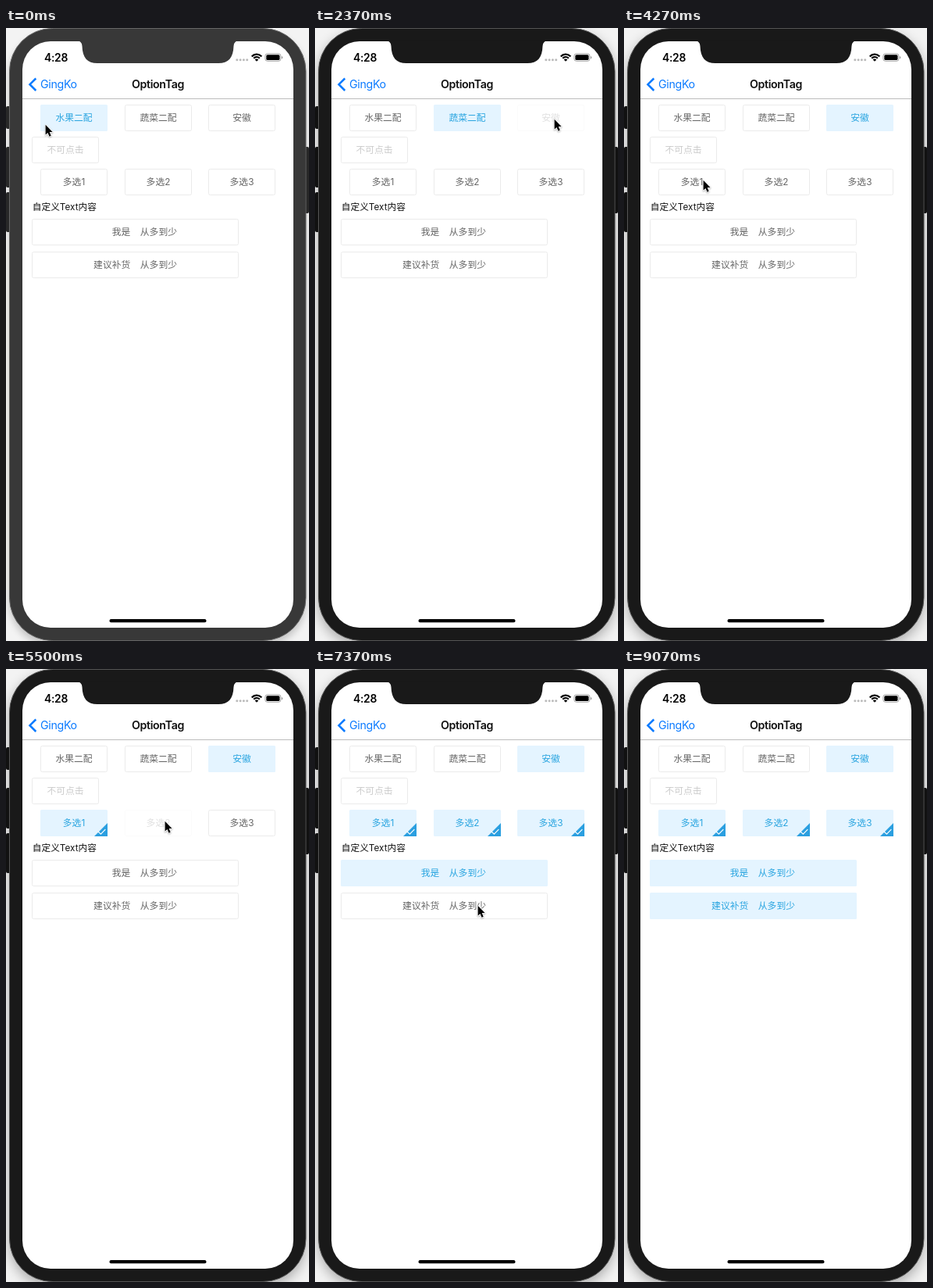
An HTML page with a canvas for the animation above (9.11 s loop, 388x784 px).

```html
<!DOCTYPE html>
<html lang="zh-CN">
<head>
<meta charset="utf-8">
<title>OptionTag</title>
<style>
  html, body { margin: 0; width: 100%; height: 100%; overflow: hidden; background: #f3f3f3; }
  canvas { display: block; width: 388px; height: 784px; }
</style>
</head>
<body>
<canvas id="stage" width="388" height="784"></canvas>
<script>
const canvas = document.getElementById('stage');
const ratio = window.devicePixelRatio || 1;
canvas.width = 388 * ratio;
canvas.height = 784 * ratio;
const ctx = canvas.getContext('2d');

const LOOP = 9110;
const ACTIVATE = 1000;
const LATIN = 'Inter, "Noto Sans CJK SC", "Noto Sans CJK", sans-serif';
const BLUE = '#2aa5e0';
const PALE = '#e4f4ff';
const GRAY = '#666';

// press / release in ms; on and off bound the selected state
const buttons = [
  { x: 44, y: 98, label: '水果二配', on: 0, off: 1260 },
  { x: 152, y: 98, label: '蔬菜二配', press: 1000, release: 1230, on: 1260, off: 2400 },
  { x: 259, y: 98, label: '安徽', press: 1930, release: 2370, on: 2400 },
  { x: 33, y: 139, label: '不可点击', disabled: true },
  { x: 44, y: 180, label: '多选1', press: 4630, release: 4790, on: 4820, tick: true },
  { x: 152, y: 180, label: '多选2', press: 5330, release: 5490, on: 5520, tick: true },
  { x: 259, y: 180, label: '多选3', press: 6010, release: 6170, on: 6200, tick: true },
  { x: 33, y: 244, w: 265, label: ['我是', '从多到少'], press: 6730, release: 6890, on: 6920 },
  { x: 33, y: 286, w: 265, label: ['建议补货', '从多到少'], press: 7430, release: 7590, on: 7620 }
];

// pointer stops: time, x, y
const path = [
  [0, 50, 123], [930, 177, 116], [1320, 177, 116], [1900, 306, 116],
  [2480, 306, 116], [3270, 107, 147], [3500, 112, 152], [3970, 112, 152],
  [4270, 101, 194], [4930, 101, 194], [5280, 203, 194], [5580, 203, 194],
  [5960, 300, 195], [6220, 300, 195], [6470, 274, 225], [6680, 240, 262],
  [6990, 240, 262], [7370, 208, 302], [7740, 208, 302], [8330, 390, 318]
];

const clamp = v => Math.min(1, Math.max(0, v));
const ease = v => v * v * (3 - 2 * v);
const mix = (a, b, p) => a + (b - a) * p;

function box(x, y, w, h, r, fill) {
  ctx.beginPath();
  ctx.roundRect(x, y, w, h, r);
  ctx.fillStyle = fill;
  ctx.fill();
}

function line(points, color, width) {
  ctx.beginPath();
  points.forEach(([x, y]) => ctx.lineTo(x, y));
  ctx.strokeStyle = color;
  ctx.lineWidth = width;
  ctx.stroke();
}

function shape(points, fill) {
  ctx.beginPath();
  points.forEach(([x, y]) => ctx.lineTo(x, y));
  ctx.closePath();
  ctx.fillStyle = fill;
  ctx.fill();
}

function text(str, x, y, size, color, align = 'center', weight = 400, spacing = 0) {
  ctx.font = `${weight} ${size}px ${LATIN}`;
  ctx.letterSpacing = spacing + 'px';
  ctx.textAlign = align;
  ctx.fillStyle = color;
  ctx.fillText(str, x, y);
}

function drawPhone(active) {
  const body = active ? '#191919' : '#383838';
  const side = active ? '#111' : '#282828';
  ctx.fillStyle = '#f3f3f3';
  ctx.fillRect(0, 0, 388, 784);

  ctx.save();
  ctx.shadowColor = active ? 'rgba(0,0,0,.3)' : 'rgba(0,0,0,.2)';
  ctx.shadowBlur = (active ? 16 : 10) * ratio;
  ctx.shadowOffsetY = 6 * ratio;
  box(4.5, 0.5, 379.5, 783, 55, body);
  ctx.restore();

  box(0, 100, 5, 29, [2, 0, 0, 2], side);
  box(0, 152, 5, 52, [2, 0, 0, 2], side);
  box(0, 210, 5, 51, [2, 0, 0, 2], side);
  box(383, 152, 5, 85, [0, 2, 2, 0], side);

  ctx.beginPath();
  ctx.roundRect(4.5, 0.5, 379.5, 783, 55);
  ctx.strokeStyle = active ? '#555' : '#666';
  ctx.lineWidth = 1;
  ctx.stroke();

  box(21, 17, 347, 750, 36, '#fff');
  drawNotch(body);
  box(132.5, 756, 124, 4.3, 2.1, '#000');
}

function drawNotch(color) {
  ctx.beginPath();
  ctx.moveTo(92, 16.5);
  ctx.quadraticCurveTo(97, 17, 97.5, 23);
  ctx.bezierCurveTo(98, 38, 104, 45, 117, 45);
  ctx.lineTo(272, 45);
  ctx.bezierCurveTo(285, 45, 291, 38, 291.5, 23);
  ctx.quadraticCurveTo(292, 17, 297, 16.5);
  ctx.fillStyle = color;
  ctx.fill();
}

function drawStatus() {
  text('4:28', 64, 42.8, 13.9, '#000', 'center', 600, -0.28);
  for (let i = 0; i < 4; i++) box(294.3 + i * 4.3, 39.2, 3, 3, 1.5, '#bbb');

  ctx.lineCap = 'butt';
  ctx.strokeStyle = '#000';
  ctx.lineWidth = 2.2;
  for (const r of [8.6, 5.2]) {
    ctx.beginPath();
    ctx.arc(321, 42.3, r, -Math.PI * 0.76, -Math.PI * 0.24);
    ctx.stroke();
  }
  ctx.beginPath();
  ctx.moveTo(321, 42.8);
  ctx.arc(321, 42.8, 3.2, -Math.PI * 0.76, -Math.PI * 0.24);
  ctx.fillStyle = '#000';
  ctx.fill();

  ctx.beginPath();
  ctx.roundRect(331.9, 32.9, 20, 9.4, 2.8);
  ctx.strokeStyle = '#999';
  ctx.lineWidth = 0.9;
  ctx.stroke();
  box(333.3, 34.2, 17.2, 6.8, 1.6, '#000');
  box(353, 36.2, 1.2, 3, [0, 1, 1, 0], '#999');
}

function drawNav() {
  ctx.lineCap = 'butt';
  ctx.lineJoin = 'miter';
  line([[38.3, 64.5], [30.5, 72.2], [38.3, 80]], '#0a7aff', 2.5);
  text('GingKo', 44, 77.2, 14.25, '#0a7aff', 'left', 400, -0.34);
  text('OptionTag', 194.5, 77.2, 14.25, '#111', 'center', 600, -0.38);
  ctx.fillStyle = '#bdbdbd';
  ctx.fillRect(21, 90, 347, 1);
}

function pressOpacity(b, t) {
  if (b.press === undefined || t < b.press) return 1;
  const down = mix(1, 0.2, ease(clamp((t - b.press) / 150)));
  return mix(down, 1, ease(clamp((t - b.release) / 250)));
}

function drawTick(x, y) {
  shape([[x, y - 17], [x, y], [x - 17, y]], '#2b9fe0');
  ctx.lineCap = ctx.lineJoin = 'round';
  line([[x - 11.5, y - 5.5], [x - 8.6, y - 2.9], [x - 3, y - 8.6]], '#fff', 1.2);
}

function drawButton(b, t) {
  const w = b.w || 86, h = 34;
  const selected = t >= b.on && t < (b.off ?? Infinity);
  const color = b.disabled ? '#ccc' : selected ? BLUE : GRAY;
  const base = b.y + 21.2;

  ctx.save();
  ctx.globalAlpha = pressOpacity(b, t);
  if (selected) {
    box(b.x, b.y, w, h, 1.5, PALE);
  } else {
    ctx.beginPath();
    ctx.roundRect(b.x + 0.5, b.y + 0.5, w - 1, h - 1, 2);
    ctx.strokeStyle = '#ebebeb';
    ctx.lineWidth = 1;
    ctx.stroke();
  }
  if (Array.isArray(b.label)) {
    text(b.label[0], 159.3, base, 11.8, color, 'right');
    text(b.label[1], 171.8, base, 11.8, color, 'left');
  } else {
    text(b.label, b.x + w / 2, base, 11.8, color);
  }
  if (selected && b.tick) drawTick(b.x + w, b.y + h);
  ctx.restore();
}

function pointerAt(t) {
  const i = path.findIndex(p => p[0] > t);
  if (i < 0) return null;
  const [t0, x0, y0] = path[i - 1], [t1, x1, y1] = path[i];
  const p = ease((t - t0) / (t1 - t0));
  return [mix(x0, x1, p), mix(y0, y1, p)];
}

function drawPointer(t) {
  const at = pointerAt(t);
  if (!at) return;
  ctx.save();
  ctx.translate(at[0], at[1]);
  const arrow = [[0.6, 0.8], [0.6, 13.6], [3.5, 10.9], [5.5, 15.7],
                 [7.7, 14.8], [5.7, 10.1], [9.6, 9.9]];
  ctx.lineJoin = 'round';
  ctx.shadowColor = 'rgba(0,0,0,.3)';
  ctx.shadowBlur = 2 * ratio;
  ctx.shadowOffsetY = ratio;
  line([...arrow, arrow[0]], '#fff', 1.7);
  ctx.shadowColor = 'transparent';
  shape(arrow, '#000');
  ctx.restore();
}

function render(t) {
  ctx.setTransform(ratio, 0, 0, ratio, 0, 0);
  drawPhone(t >= ACTIVATE);
  drawStatus();
  drawNav();
  text('自定义Text内容', 33.8, 232.7, 11.7, '#111', 'left');
  buttons.forEach(b => drawButton(b, t));
  drawPointer(t);
}

const start = performance.now();
function tick() {
  render((performance.now() - start) % LOOP);
  requestAnimationFrame(tick);
}
tick();
</script>
</body>
</html>
```
